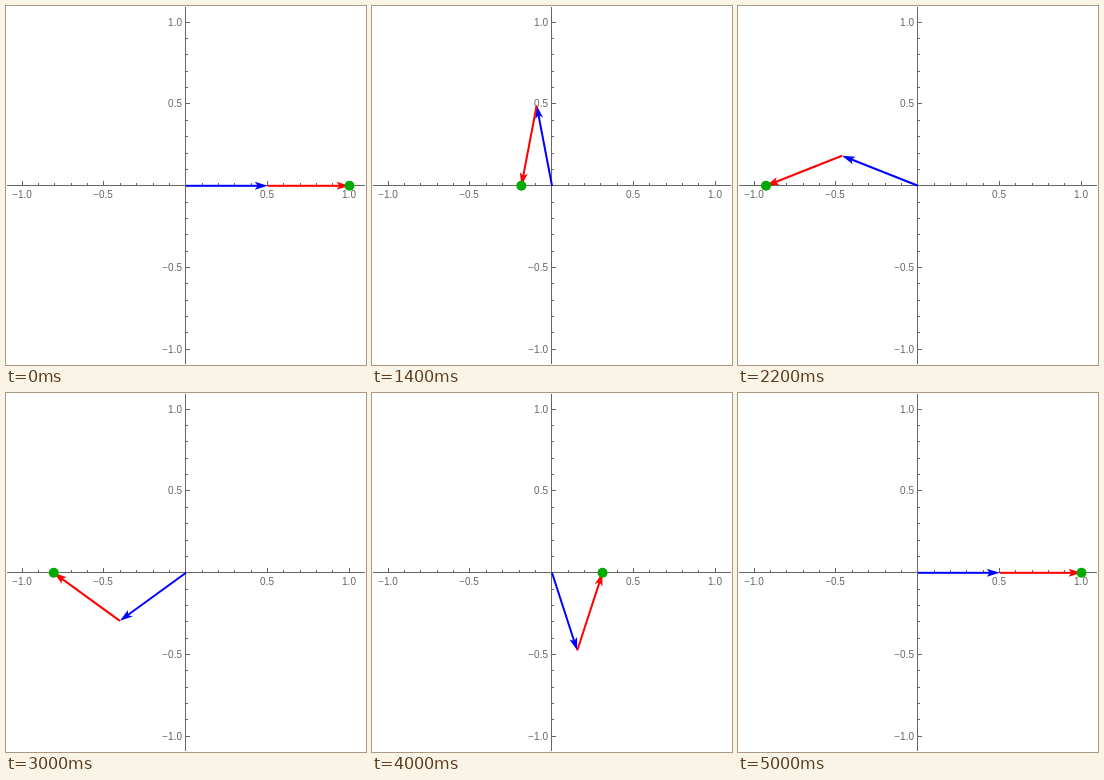
Animation, 360 px wide and 359 px high, one loop 5.1 s. Source, as an HTML page with a canvas:

```html
<!DOCTYPE html>
<html>
<head>
<meta charset="utf-8">
<style>
html, body { margin: 0; width: 100%; height: 100%; overflow: hidden; background: #fff; }
canvas { display: block; }
</style>
</head>
<body>
<canvas id="stage" width="360" height="359"></canvas>
<script>
const ctx = document.getElementById('stage').getContext('2d');
const CX = 180, CY = 179.8, UNIT = 163.5;
const STEP_MS = 100, STEPS = 50;

function drawAxes() {
  ctx.fillStyle = '#666';
  ctx.fillRect(1, 179, 358, 1);
  ctx.fillRect(179, 1, 1, 357);
  ctx.font = '10px "Liberation Sans", Arial, sans-serif';
  for (let i = -10; i <= 10; i++) {
    if (!i) continue;
    const major = i % 5 === 0, length = major ? 4 : 2;
    const x = Math.floor(CX + i / 10 * UNIT - 0.3);
    const y = Math.floor(CY - i / 10 * UNIT - 0.1);
    ctx.fillRect(x, 179 - length, 1, length);
    ctx.fillRect(180, y, length, 1);
    if (!major) continue;
    const label = (i / 10).toFixed(1).replace('-', '\u2212');
    ctx.textAlign = 'center';
    ctx.fillText(label, x, 192);
    ctx.textAlign = 'right';
    ctx.fillText(label, 176, y + 4);
  }
}

function drawArrow(x, y, angle, color) {
  const length = UNIT / 2;
  ctx.save();
  ctx.translate(x, y);
  ctx.rotate(angle);
  ctx.fillStyle = color;
  ctx.fillRect(0, -1, length - 9, 2);
  ctx.beginPath();
  ctx.moveTo(length, 0);
  ctx.lineTo(length - 13, -4);
  ctx.lineTo(length - 10, 0);
  ctx.lineTo(length - 13, 4);
  ctx.fill();
  ctx.restore();
}

function draw(now) {
  const step = Math.floor(now / STEP_MS) % (STEPS + 1);
  const angle = 2 * Math.PI * step / STEPS;
  const dx = UNIT / 2 * Math.cos(angle), dy = UNIT / 2 * Math.sin(angle);
  ctx.clearRect(0, 0, 360, 359);
  drawAxes();
  drawArrow(CX, CY, -angle, '#00f');
  drawArrow(CX + dx, CY - dy, angle, '#f00');
  ctx.fillStyle = '#0a0';
  ctx.beginPath();
  ctx.arc(CX + 2 * dx, CY, 5, 0, 2 * Math.PI);
  ctx.fill();
}

const start = performance.now();
function tick() {
  draw(performance.now() - start);
  requestAnimationFrame(tick);
}
tick();
</script>
</body>
</html>
```
